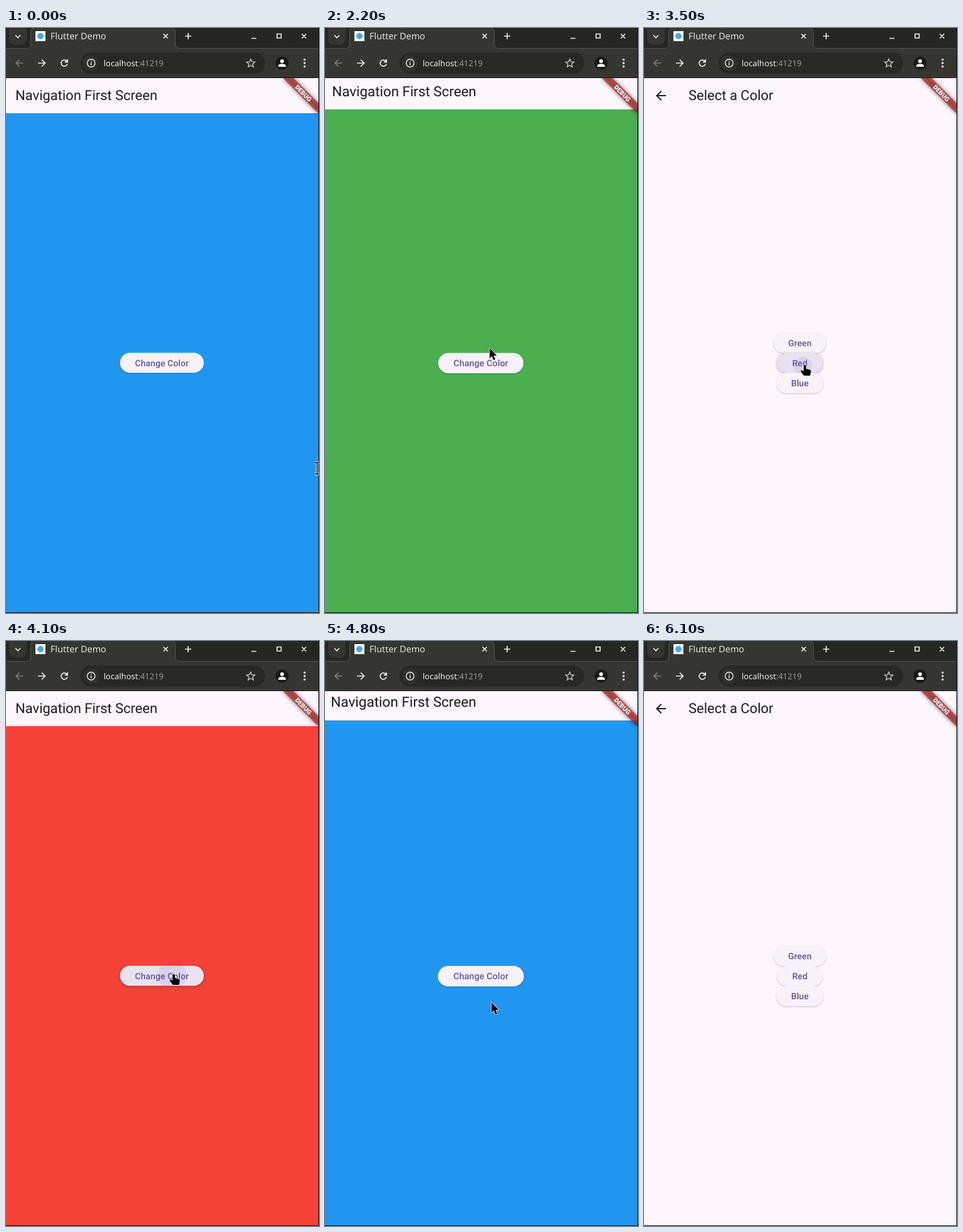
An HTML page that plays this animation: 500 px wide and 934 px high, repeating every 6500 ms.

```html
<!DOCTYPE html>
<html lang="en">
<head>
<meta charset="utf-8">
<title>Navigation demo</title>
<style>
html, body { margin: 0; width: 100%; height: 100%; overflow: hidden; background: #0d0d0c; }
svg { display: block; width: 500px; height: 934px; text-rendering: geometricPrecision; }
.ui { font-family: "Noto Sans", sans-serif; }
.title { font: 400 22px Roboto, sans-serif; fill: #1d1b20; }
.label { font: 500 14px Roboto, sans-serif; letter-spacing: .1px; fill: #6554a0; text-anchor: middle; }
.debug { font: 900 10.2px Roboto, sans-serif; fill: #fff; text-anchor: middle; }
.icon { fill: none; stroke: #ecece8; stroke-width: 1.7; }
.pill { fill: #f7f2fa; filter: drop-shadow(0 1px 1px rgba(0,0,0,.24)); }
.pill.hover { fill: #e8e1f0; filter: drop-shadow(0 1px 2px rgba(0,0,0,.32)); }
.splash { fill: #6750a4; }
.cursor { stroke: #fff; stroke-width: 1.3; stroke-linejoin: round; paint-order: stroke; }
</style>
</head>
<body>
<svg id="stage" viewBox="0 0 500 934" xmlns="http://www.w3.org/2000/svg">
  <defs>
    <clipPath id="view"><rect y="80" width="499" height="853"/></clipPath>
    <filter id="soft" x="-30%" y="-150%" width="160%" height="400%"><feGaussianBlur stdDeviation="3.5"/></filter>
  </defs>

  <g class="ui">
    <rect width="500" height="934" fill="#0d0d0c"/>
    <rect width="499" height="33" fill="#262623"/>
    <path d="M0 79V32.5H32Q39.500 32.500 39.500 25V8Q39.500 -.500 47 -.500H263Q270.500 -.500 270.500 8V25Q270.500 32.500 278 32.500H499V79Z" fill="#353532"/>
    <path d="M0 32.500H32Q39.500 32.500 39.500 25V8Q39.500 -.500 47 -.500H263Q270.500 -.500 270.500 8V25Q270.500 32.500 278 32.500H499" fill="none" stroke="#575753"/>
    <rect x="5" y="-6" width="28" height="33" rx="9" fill="#353532"/>
    <path class="icon" d="M15 11.500L19 15.500L23 11.500"/>
    <rect x="47" y="5" width="16" height="16" fill="#fff"/>
    <circle cx="55" cy="13" r="5" fill="#42a9ea"/>
    <text x="71" y="18" font-size="14.400" fill="#e4e4e0">Flutter Demo</text>
    <path class="icon" d="M251.500 9.500L258.500 16.500M258.500 9.500L251.500 16.500M286 13H296M291 8V18"/>
    <path class="icon" stroke-width="2" d="M392 16.500H400M433 9.500H439.500V16H433ZM472.500 9.500L479.500 16.500M479.500 9.500L472.500 16.500"/>
    <path class="icon" style="stroke:#7d7d79" d="M27.500 56H16M21.500 50.500L16 56L21.500 61.500"/>
    <path class="icon" d="M51 56H62.500M57 50.500L62.500 56L57 61.500"/>
    <path class="icon" d="M97.300 53.300A5 5 0 1 0 98 57.500M98.200 50V54.300H94"/>
    <rect x="119" y="39" width="295" height="34" rx="17" fill="#282825"/>
    <circle cx="136" cy="56" r="13" fill="#30302d"/>
    <circle class="icon" cx="136" cy="56" r="6.200" style="stroke-width:1.400"/>
    <path class="icon" style="stroke-width:1.500" d="M136 55V59.500M136 52.300V53.800"/>
    <text x="156" y="60.500" font-size="13" fill="#ecece8">localhost<tspan fill="#9b9b96">:41219</tspan></text>
    <path id="star" class="icon" style="stroke:#c9c9c4;stroke-width:1.400"/>
    <circle cx="441" cy="56" r="10.500" fill="#191917"/>
    <circle cx="441" cy="53" r="3" fill="#fff"/>
    <path d="M435 62V60.500Q435 57.300 441 57.300T447 60.500V62Z" fill="#fff"/>
    <g fill="#ecece8"><circle cx="477" cy="50.500" r="1.700"/><circle cx="477" cy="56" r="1.700"/><circle cx="477" cy="61.500" r="1.700"/></g>
    <rect y="79" width="500" height="1" fill="#1b1b19"/>
  </g>

  <g clip-path="url(#view)">
    <g id="home">
      <rect y="80" width="499" height="56" fill="#fdf7fd"/>
      <rect id="body" y="136" width="499" height="798"/>
      <text class="title" x="15" y="115">Navigation First Screen</text>
    </g>
    <rect id="scrim" y="80" width="499" height="854"/>
    <g id="picker">
      <rect y="80" width="499" height="854" fill="#fdf7fd"/>
      <path transform="translate(15 96)" fill="#1d1b20" d="M20 11H7.830l5.590-5.590L12 4l-8 8 8 8 1.410-1.410L7.830 13H20z"/>
      <text class="title" x="71" y="115">Select a Color</text>
    </g>
    <g transform="translate(499 80) rotate(45)">
      <rect x="-40" y="28" width="80" height="12" fill="#000" opacity=".5" filter="url(#soft)"/>
      <rect x="-40" y="28" width="80" height="12" fill="#b71c1c" opacity=".63"/>
      <text class="debug" x="0" y="37.600">DEBUG</text>
    </g>
  </g>

  <g id="pointer">
    <path id="arrow" class="cursor" d="M0 0V16.500L3.700 13L6.300 19.200L9 18L6.400 12H11.500Z"/>
    <path id="hand" class="cursor" d="M-2 1Q0 -1 2 1V6L8 7.500Q10 8 9.600 10.500L8.500 17H-1.500L-6.500 10.500Q-7 8 -4.500 8.500L-2 10Z"/>
    <g id="beam" fill="none">
      <path d="M-4 -9H4M-4 9H4M0 -9V9" stroke="#fff" stroke-width="3.400"/>
      <path d="M-4 -9H4M-4 9H4M0 -9V9" stroke="#000" stroke-width="1.400"/>
    </g>
  </g>
</svg>

<script>
const LOOP = 6500, STEP = 100, NAV = 300;
const BLUE = '#2196f0', GREEN = '#4bae4f', RED = '#f44336';
const $ = id => document.getElementById(id);
const set = (el, attrs) => { for (const k in attrs) el.setAttribute(k, attrs[k]); };
const clamp = v => Math.max(0, Math.min(1, v));
const span = (v, a, b) => clamp((v - a) / (b - a));

// Page changes; a colour marks a return to the first page.
const navs = [
  [-1000, BLUE], [1060], [2090, GREEN], [3060], [3640, RED], [4260], [4707, BLUE], [5760]
];

// Pointer path: time, x, y
const path = [
  [0, 497, 703], [100, 450, 699], [200, 385, 628], [300, 325, 545], [400, 285, 490],
  [500, 258, 521], [600, 246, 541], [1200, 246, 541], [1450, 255, 524], [1700, 263, 511],
  [2200, 263, 511], [2300, 264, 524], [2500, 262, 565], [2800, 257, 538], [3700, 257, 538],
  [4000, 268, 532], [4400, 268, 532], [4600, 266, 577], [4800, 266, 577], [5000, 266, 593],
  [5100, 265, 590], [5300, 263, 550], [5500, 262, 540], [5800, 262, 540], [5900, 320, 562],
  [6000, 430, 600], [6100, 580, 640]
];

function makeButton(page, text, y, w, presses) {
  const x = 249 - w / 2, id = 'clip' + text.replace(' ', '');
  const g = document.createElementNS('http://www.w3.org/2000/svg', 'g');
  const box = `x="${x}" y="${y - 16}" width="${w}" height="32" rx="16"`;
  g.innerHTML = `<clipPath id="${id}"><rect ${box}/></clipPath><rect class="pill" ${box}/>
    <g clip-path="url(#${id})"><circle class="splash"/></g>
    <text class="label" x="249" y="${y + 5}">${text}</text>`;
  $(page).append(g);
  return {
    page, y, w, presses,
    pill: g.querySelector('.pill'), splash: g.querySelector('.splash')
  };
}

// Each press: time down, time up
const buttons = [
  makeButton('home', 'Change Color', 534.5, 134, [[850, 1060], [2860, 3060], [4050, 4260], [5640, 5760]]),
  makeButton('picker', 'Green', 503, 84, [[1750, 2090]]),
  makeButton('picker', 'Red', 535, 73, [[3420, 3640]]),
  makeButton('picker', 'Blue', 567, 75, [[4560, 4707]])
];

set($('star'), {
  d: 'M' + Array.from({ length: 10 }, (_, i) => {
    const a = i * Math.PI / 5, r = i % 2 ? 3.2 : 7;
    return `${391 + r * Math.sin(a)} ${56.5 - r * Math.cos(a)}`;
  }).join('L') + 'Z'
});

function bezier(x1, y1, x2, y2, x) {
  const at = (a, b, s) => 3 * (1 - s) * (1 - s) * s * a + 3 * (1 - s) * s * s * b + s * s * s;
  let lo = 0, hi = 1;
  for (let i = 0; i < 24; i++) {
    const mid = (lo + hi) / 2;
    if (at(x1, x2, mid) < x) lo = mid; else hi = mid;
  }
  return at(y1, y2, lo);
}

// Fast start, very slow end
const zoom = u => u >= 1 ? 1 : u < 1 / 6
  ? .4 * bezier(.05, 0, .1333, .06, u * 6)
  : .4 + .6 * bezier(.2083, .82, .25, 1, (u - 1 / 6) * 1.2);

function pointerAt(t) {
  const i = path.findIndex(p => p[0] > t);
  if (i < 0) return path[path.length - 1].slice(1);
  const [a, b] = [path[i - 1], path[i]], k = span(t, a[0], b[0]);
  return [a[1] + (b[1] - a[1]) * k, a[2] + (b[2] - a[2]) * k];
}

function scalePage(id, s, alpha) {
  set($(id), {
    transform: `translate(249.5 507) scale(${s}) translate(-249.5 -507)`,
    opacity: alpha
  });
}

function drawPages(t) {
  const past = navs.filter(n => n[0] <= t);
  const [start, back] = past[past.length - 1];
  const u = clamp((t - start) / NAV), p = zoom(u);
  const color = past.filter(n => n[1]).pop()[1];
  set($('body'), { fill: color });
  if (back) {
    scalePage('home', 1.1 - .1 * p, 1);
    scalePage('picker', 1 - .1 * p, 1 - span(u, .0825, .2075));
    set($('scrim'), { opacity: 0 });
  } else {
    scalePage('home', 1 + .05 * p, 1);
    scalePage('picker', .85 + .15 * p, span(u, .125, .25));
    set($('scrim'), { opacity: .6 * span(u, .2075, .4175) });
  }
  return back || t - start < 60 ? 'home' : 'picker';
}

function drawButton(b, t, page, x, y) {
  const over = b.page === page && Math.abs(x - 249) < b.w / 2 && Math.abs(y - b.y) < 16;
  b.pill.classList.toggle('hover', over);
  const press = b.presses.find(([down, up]) => t >= down && t < up + 200);
  if (press) {
    const age = t - press[0];
    set(b.splash, {
      cx: x - 3, cy: y + 2,
      r: b.w * (.12 + .001 * age),
      opacity: .1 * (1 - span(t, press[1], press[1] + 200))
    });
  } else set(b.splash, { r: 0 });
  return over;
}

function draw(t) {
  const page = drawPages(t), [x, y] = pointerAt(t);
  const over = buttons.map(b => drawButton(b, t, page, x, y)).some(Boolean);
  const kind = t < 100 ? 'beam' : over ? 'hand' : 'arrow';
  for (const id of ['beam', 'hand', 'arrow']) set($(id), { display: id === kind ? 'inline' : 'none' });
  set($('pointer'), { transform: `translate(${x} ${y})` });
}

let shown = -1;
const begin = performance.now();
function tick() {
  const t = (performance.now() - begin) % LOOP;
  const step = Math.floor(t / STEP) * STEP;
  if (step !== shown) draw(shown = step);
  requestAnimationFrame(tick);
}
draw(0);
tick();
</script>
</body>
</html>
```
